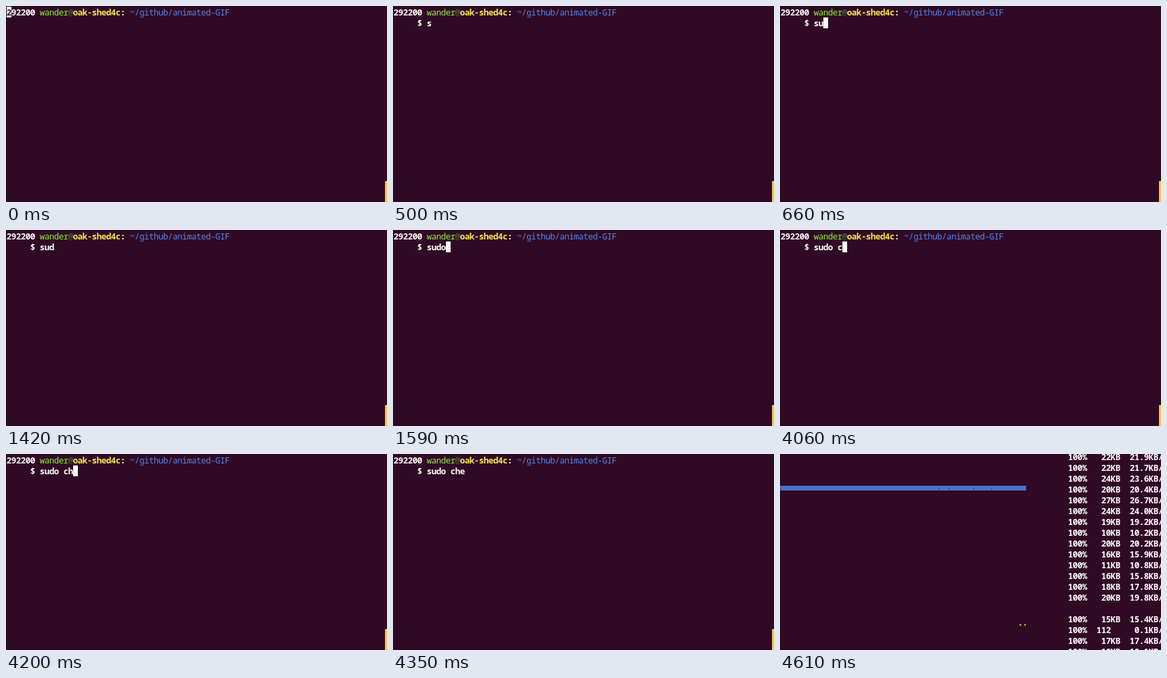
Animation, 562 px wide and 290 px high, one loop 8 s. Source, as an HTML page:

```html
<!DOCTYPE html>
<html lang="en">
<head>
<meta charset="utf-8">
<title>Terminal session</title>
<style>
  html, body { margin: 0; width: 100%; height: 100%; overflow: hidden; background: #300a24; }
  svg { display: block; width: 562px; height: 290px; }
  text {
    font: 600 12.5px "Noto Sans Mono", "DejaVu Sans Mono", monospace;
    letter-spacing: calc(7px - 0.6em);
    white-space: pre;
    fill: #fff;
  }
  .thin { font-weight: 500; }
</style>
</head>
<body>
<svg viewBox="0 0 562 290">
  <rect width="562" height="290" fill="#300a24"/>
  <g id="shell">
    <rect x="559" y="259" width="3" height="31" fill="#fdc444"/>
    <rect id="cursor" width="7" height="16" fill="#fff"/>
  </g>
  <g id="copy" visibility="hidden">
    <rect y="47" width="363" height="7" fill="#4a72cc"/>
  </g>
</svg>
<script>
const NS = "http://www.w3.org/2000/svg";
const CELL = 7, ROW = 16, LOOP = 8000, BG = "#300a24";
const $ = id => document.getElementById(id);
const shell = $("shell"), copy = $("copy"), cursor = $("cursor");

function add(parent, tag, attrs, text = "") {
  const el = document.createElementNS(NS, tag);
  for (const key in attrs) el.setAttribute(key, attrs[key]);
  el.textContent = text;
  return parent.appendChild(el);
}

function write(parent, x, y, text, fill = "#fff", cls = "") {
  return add(parent, "text", { x: x - 0.25, y, class: cls, style: `fill:${fill}` }, text);
}

// Prompt: column, text, colour, weight
const first = write(shell, 1, 14, "2");
[
  [1, "92200", "#fff"],
  [7, "wander", "#92ee38", "thin"],
  [13, "@", "#4d7a45", "thin"],
  [14, "oak-shed4c", "#fce94f"],
  [24, ":", "#fff"],
  [26, "~/github/animated-GIF", "#5585ea", "thin"]
].forEach(([col, ...rest]) => write(shell, 1 + col * CELL, 14, ...rest));
const typed = write(shell, 36, 30, "");

// Transfer list: size and rate per line
const rates = [
  [22, "21.9"], [22, "21.7"], [24, "23.6"], [20, "20.4"], [27, "26.7"],
  [24, "24.0"], [19, "19.2"], [10, "10.2"], [20, "20.2"], [16, "15.9"],
  [11, "10.8"], [16, "15.8"], [18, "17.8"], [20, "19.8"], null,
  [15, "15.4"], [112, "0.1"], [17, "17.4"], [18, "18.1"]
];
rates.forEach((line, i) => {
  if (!line) return;
  const [size, rate] = line;
  const amount = size > 99 ? `  ${size}  ` : `   ${size}KB`;
  write(copy, 425, 9 + i * ROW, `100%${amount}  ${rate.padStart(4)}KB/s`);
});
[1, 234, 249, 285, 312].forEach(x =>
  add(copy, "rect", { x, y: 51, width: 1, height: 1.5, fill: BG }));
write(copy, 351, 254, "..", "#fce94f");

// Time, text on the second row, cursor column and row (null hides the cursor)
const steps = [
  [0, "", [0, 0]],
  [500, "$ s", null],
  [660, "$ su", [9, 1]],
  [1420, "$ sud", null],
  [1590, "$ sudo", [11, 1]],
  [1720, "$ sudo ", [12, 1]],
  [4060, "$ sudo c", [13, 1]],
  [4200, "$ sudo ch", [14, 1]],
  [4350, "$ sudo che", null],
  [4610, null, null]
];

let shown = null;
function show(step) {
  if (step === shown) return;
  shown = step;
  const [, text, at] = step;
  const done = text === null;
  shell.setAttribute("visibility", done ? "hidden" : "visible");
  copy.setAttribute("visibility", done ? "visible" : "hidden");
  typed.textContent = text || "";
  cursor.setAttribute("display", at ? "inline" : "none");
  if (at) {
    cursor.setAttribute("x", 1 + at[0] * CELL);
    cursor.setAttribute("y", 1 + at[1] * ROW);
  }
  first.style.fill = at && at[1] === 0 ? BG : "#fff";
}

const start = performance.now();
function frame() {
  const t = (performance.now() - start) % LOOP;
  show(steps.filter(s => s[0] <= t).pop());
  requestAnimationFrame(frame);
}
show(steps[0]);
requestAnimationFrame(frame);
</script>
</body>
</html>
```
